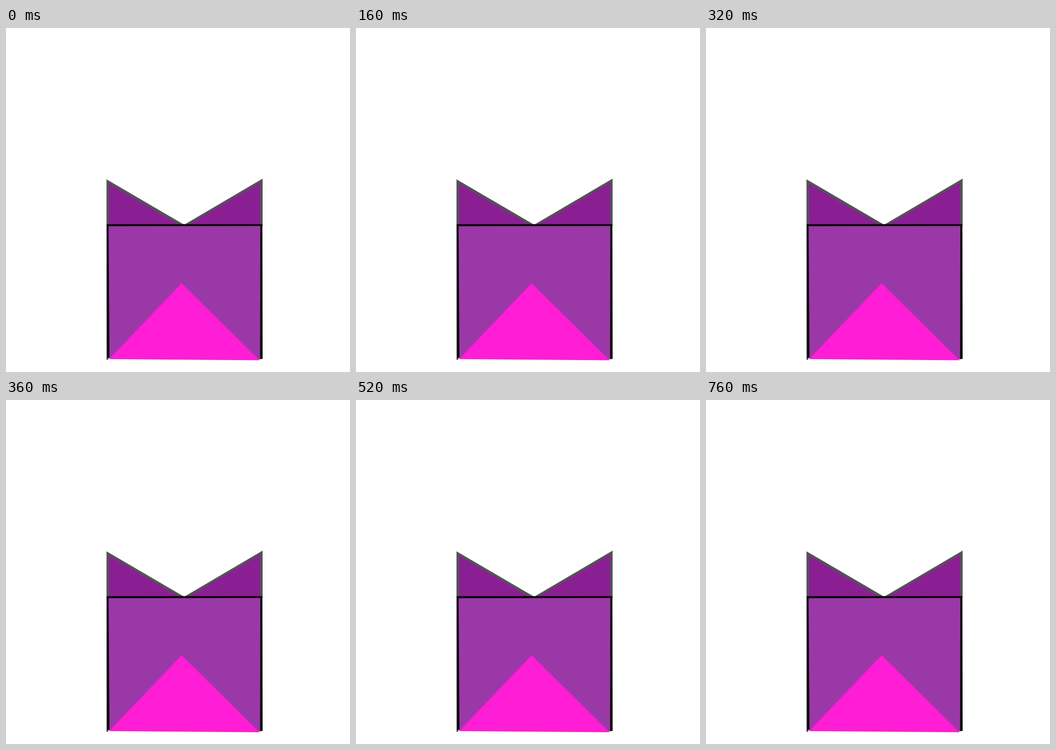
An HTML page with a canvas for the animation above (800 ms loop, 748 px wide and 748 px high).

```html
<!DOCTYPE html>
<html lang="en">
<head>
<meta charset="utf-8">
<title>Cat box</title>
<style>
  html, body { margin: 0; width: 100%; height: 100%; overflow: hidden; background: #fff; }
  canvas { display: block; }
</style>
</head>
<body>
<canvas id="stage" width="748" height="748"></canvas>
<script>
const ctx = document.getElementById('stage').getContext('2d');
const GREY = '#535355', BLACK = '#080408';
const EAR = '#8a1f94', BODY = '#9b38a7', PINK = '#ff1dd5';

function polygon(color, ...points) {
  ctx.fillStyle = color;
  ctx.beginPath();
  for (const [x, y] of points) ctx.lineTo(x, y);
  ctx.closePath();
  ctx.fill();
}

function drawEars() {
  polygon(GREY, [218.5, 329], [387, 427.5], [387, 429], [218.5, 429]);
  polygon(EAR, [224, 338.5], [377, 428], [224, 428]);
  polygon(GREY, [558, 327.5], [387, 428], [387, 429], [558, 429]);
  polygon(EAR, [553, 336.5], [396, 428], [553, 428]);
}

function drawBody() {
  polygon(BODY, [222, 429], [555, 429], [553, 720.5], [224, 718]);
  polygon(BLACK, [219, 426.5], [557.5, 426.5], [557.5, 430.5], [219, 431]);
  polygon(GREY, [218.5, 428], [221, 428], [223, 719], [221, 722], [218.5, 721]);
  polygon(BLACK, [219, 427], [223, 427], [225, 716.5], [220, 718]);
  polygon(BLACK, [553, 427], [557.5, 427], [558, 719.5], [552.5, 720]);
  polygon(PINK, [382, 555], [551.5, 722.5], [224, 720]);
}

// The pose holds still for the whole loop.
function render() {
  ctx.fillStyle = '#fff';
  ctx.fillRect(0, 0, 748, 748);
  drawEars();
  drawBody();
  requestAnimationFrame(render);
}
render();
</script>
</body>
</html>
```
